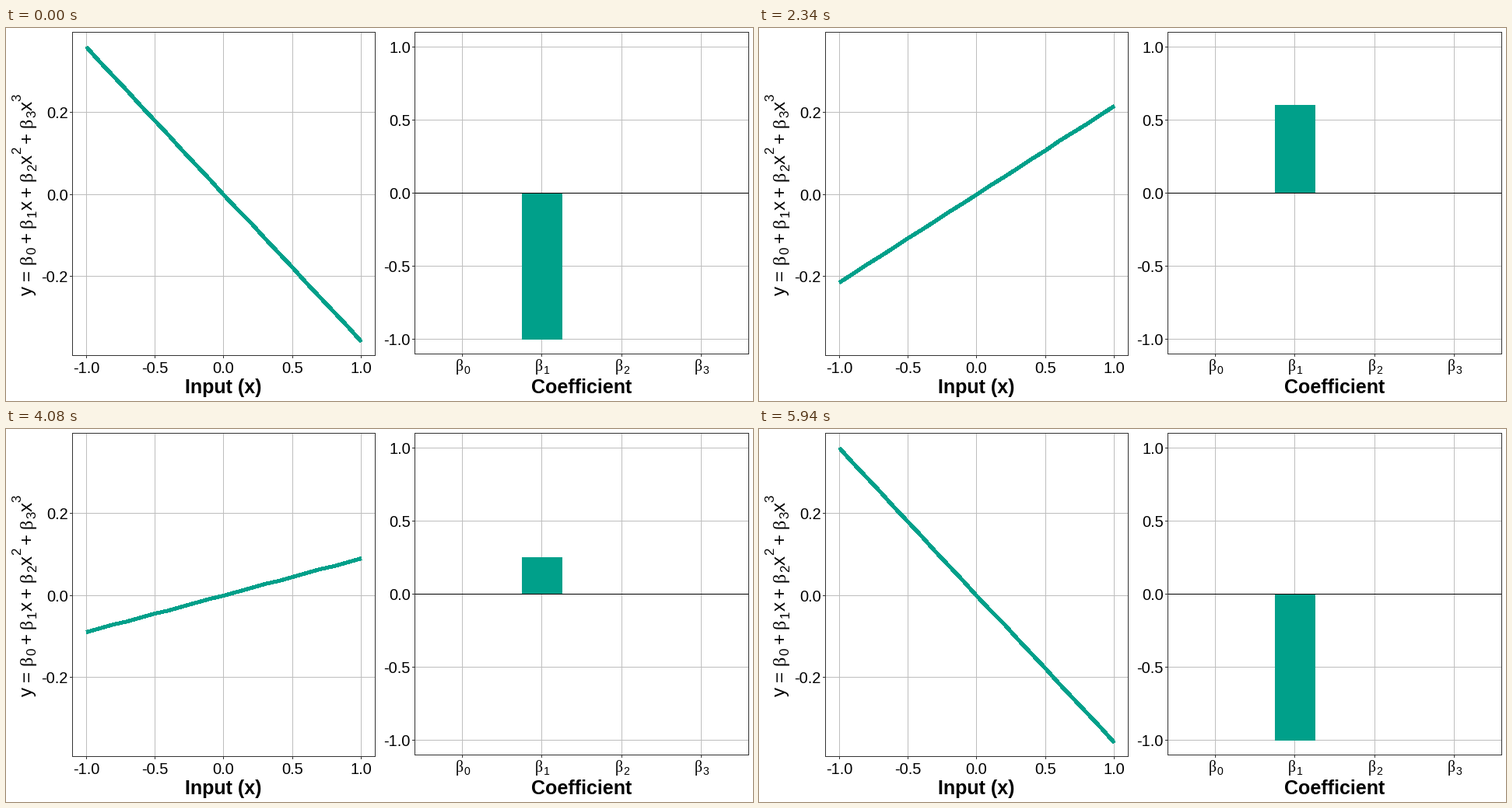
A matplotlib script for the animation above (6000 ms loop, 960 px wide and 480 px high).

```python
import numpy as np
import matplotlib.pyplot as plt
from matplotlib.animation import FuncAnimation
from matplotlib.patches import Rectangle

W, H, DPI = 960, 480, 100
PX = 72 / DPI          # points per pixel
TEAL, GRID, FRAME = "#00A08A", "#BEBEBE", "#333333"
SANS, SERIF = "Liberation Sans", "Liberation Serif"
HALF = 50              # pictures in each direction

fig = plt.figure(figsize=(W / DPI, H / DPI), dpi=DPI, facecolor="white")
ax = fig.add_axes([0, 0, 1, 1])
ax.set_xlim(0, W)
ax.set_ylim(H, 0)
ax.axis("off")


def box(x0, y0, x1, y1, color, z):
    """Fill the pixels from (x0, y0) up to, not including, (x1, y1)."""
    patch = Rectangle((x0, y0), x1 - x0, y1 - y0, fc=color, lw=0,
                      antialiased=False, zorder=z)
    return ax.add_patch(patch)


def label(x, y, s, size, font=SANS, **kw):
    ax.text(x, y, s, fontsize=size * PX, family=font, color="black",
            va="baseline", rotation_mode="anchor", zorder=6, **kw)


def panel(left, top, right, bottom, xs, ys):
    """Grid, border and ticks; all positions are pixel rows and columns."""
    for x in xs:
        box(x, top, x + 1, bottom, GRID, 1)
        box(x, bottom + 1, x + 1, bottom + 4, FRAME, 5)
    for y in ys:
        box(left, y, right, y + 1, GRID, 1)
        box(left - 3, y, left, y + 1, FRAME, 5)
    for y in (top, bottom):
        box(left, y, right + 1, y + 1, FRAME, 5)
    for x in (left, right):
        box(x, top, x + 1, bottom + 1, FRAME, 5)


def formula(parts, x, y, size, vertical=False):
    """Set a row of (text, advance in em, kind) pieces from a start point."""
    pos = 0
    for s, advance, kind in parts:
        scale = 0.7 if kind in ("sub", "sup") else 1
        shift = {"sub": 0.22, "sup": -0.58}.get(kind, 0) * size
        font = SERIF if kind == "sym" else SANS
        if s and vertical:
            label(x + shift, y - pos, s, size * scale, font, rotation=90)
        elif s:
            label(x + pos, y + shift, s, size * scale, font)
        pos += advance * size * scale


def beta(i):
    return [("β", 0.549, "sym"), (str(i), 0.556, "sub")]


def operator(s, gap):
    return [("", gap, ""), (s, 0.584, ""), ("", gap, "")]


# Left panel: the curve
left_x = np.linspace(-1, 1, 5)
left_y = np.array([0.2, 0.0, -0.2])
cols = np.rint(279.4 + 176.8 * left_x).astype(int)
rows = np.rint(213.6 - 526 * left_y).astype(int)
panel(85, 5, 474, 421, cols, rows)
for v, c in zip(left_x, cols):
    label(c + 0.5, 444, f"{v:.1f}", 20, ha="center")
for v, r in zip(left_y, rows):
    label(80, r + 8, f"{v:.1f}", 20, ha="right")
label(279, 470, "Input (x)", 25, ha="center", weight="bold")

plus = operator("+", 4 / 18)
x_term = [("x", 0.5, "")]
title = [("y", 0.5, "")] + operator("=", 5 / 18) + beta(0)
title += plus + beta(1) + x_term
for power in (2, 3):
    title += plus + beta(power) + x_term + [(str(power), 0.556, "sup")]
formula(title, 33.5, 343.5, 24.1, vertical=True)

# Right panel: the coefficients
right_y = np.linspace(1, -1, 5)
cols = np.rint(586.3 + 102.14 * np.arange(4)).astype(int)
rows = np.rint(212 - 188.2 * right_y).astype(int)
panel(525, 5, 954, 419, cols, rows)
for i, c in enumerate(cols):
    formula(beta(i), c - 8.6, 441, 20)
for v, r in zip(right_y, rows):
    label(520, r + 8, f"{v:.1f}", 20, ha="right")
label(739.5, 470, "Coefficient", 25, ha="center", weight="bold")
box(525, 212, 954, 213, "black", 4)

# Moving parts
xs = np.linspace(-1, 1, 21)
curve_x = np.rint(279.4 + 176.8 * xs) + 0.5
curve, = ax.plot(curve_x, curve_x, color=TEAL, lw=4 * PX, zorder=3,
                 antialiased=False, solid_capstyle="butt",
                 solid_joinstyle="round", snap=False)
bar = box(663, 212, 715, 213, TEAL, 3)

# Steps of 0.05, each pinned to its nearest picture and blended between
steps = np.linspace(-1, 1, 41)
pins = np.rint(np.arange(41) * (HALF - 1) / 40)
slopes = np.interp(np.arange(HALF), pins, steps)


def draw(i):
    b = slopes[min(i, 2 * HALF - 1 - i)]
    curve.set_ydata(np.rint(213.6 - 189.2 * b * xs) + 0.5)
    tip = round(212 - 188.2 * b)
    bar.set_y(min(tip, 212))
    bar.set_height(abs(tip - 212) + 1)
    return curve, bar


anim = FuncAnimation(fig, draw, frames=2 * HALF, interval=60,
                     repeat=True, repeat_delay=0)
plt.show()
```
